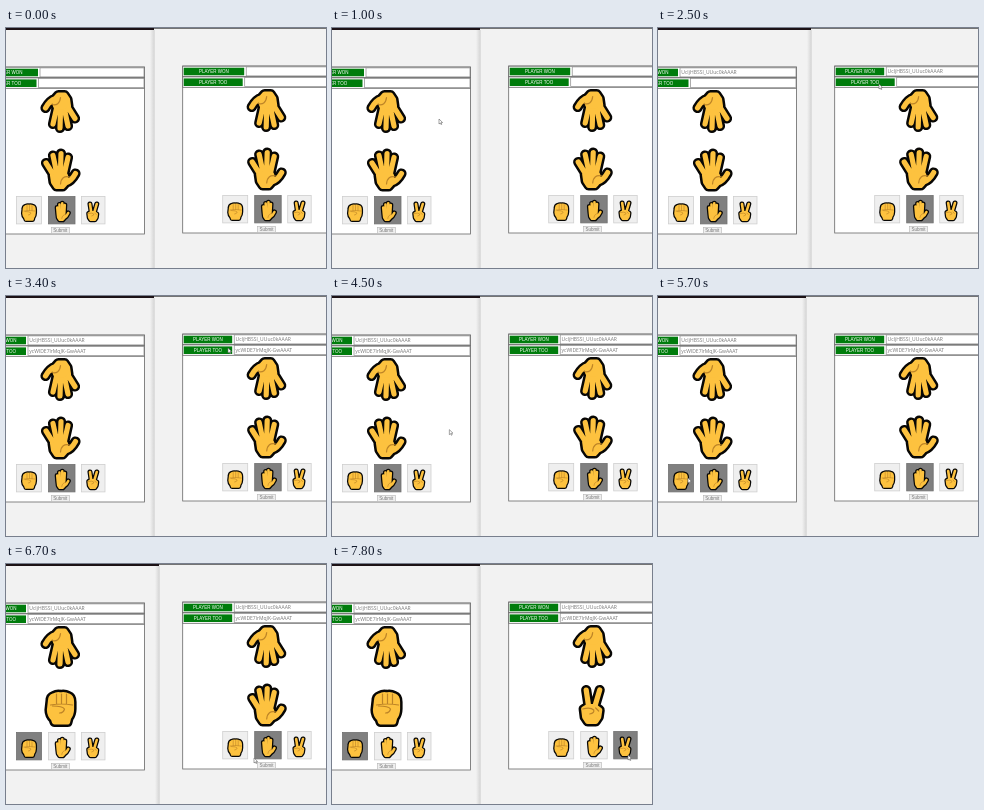
Write an HTML page with a canvas that moves like this. It is 320 px wide and 240 px high and loops after 8 s.

```html
<!DOCTYPE html>
<html lang="en">
<head>
<meta charset="utf-8">
<title>Hand game, two players</title>
<style>
  html, body { margin: 0; width: 100%; height: 100%; overflow: hidden; background: #f2f2f2; }
  canvas { display: block; width: 320px; height: 240px; }
</style>
</head>
<body>
<canvas id="stage"></canvas>
<script>
const LOOP = 8000;
const RIGHT_OFFSET = [206.2, -1];
const canvas = document.getElementById('stage');
const ctx = canvas.getContext('2d');
const ratio = window.devicePixelRatio || 1;
canvas.width = 320 * ratio;
canvas.height = 240 * ratio;

// Each gesture: a thick skeleton plus thin crease lines, centred on 0,0.
const gestures = {
  splayed: {
    body: new Path2D('M-7 5L-14.5-7M-4 2L-7.5-14.5M0 1L0.5-16.5M4 3L7.5-12.5M5 13Q11 11 15 3.5M-8 5L-4 2L3 2L5 6L6 12L2 16.5L-4 16.5L-7 12Z'),
    crease: new Path2D('M9 7Q1 5 0 14')
  },
  raised: {
    body: new Path2D('M-8 4L-9-8M-4 2L-4.5-14M1 2L1-16.5M5 4L6-13M5 13Q10 10 13 3M-8 4L-4 1L3 1L5 6L5 13L2 16.5L-4 16.5L-7 12Z'),
    crease: new Path2D('M8 6Q1 6 0 14')
  },
  fist: {
    body: new Path2D('M-7-10Q-3-12 0-11Q4-12 8-10Q11-9 11-4L11 3Q11 8 8 12L7 16L-6 16L-7 13Q-11 9-11 4L-10-5Q-10-9-7-10Z'),
    crease: new Path2D('M-4-12L-4-2M1-12L1-2M6-12L6-2M-10-1Q1-3 12-1M-8 0Q2 0 4 3Q3 7-1 7')
  },
  peace: {
    body: new Path2D('M-4 2L-6.5-15M2 2L7-15M-9 4L-4 1L3 2L7 5L6 12L3 16.5L-5 16.5L-8 12Z'),
    crease: new Path2D('M-10 4Q-2 2 1 5Q2 8-3 9M3 3L6 6')
  }
};

function drawGesture(name, x, y, scale = 1) {
  const { body, crease } = gestures[name];
  ctx.save();
  ctx.translate(x, y);
  ctx.scale(scale, scale);
  ctx.lineCap = ctx.lineJoin = 'round';
  for (const [color, width] of [['#080705', 10.2], ['#fdc23f', 5.2]]) {
    ctx.strokeStyle = ctx.fillStyle = color;
    ctx.lineWidth = width;
    ctx.stroke(body);
    ctx.fill(body);
  }
  ctx.strokeStyle = '#bd8427';
  ctx.lineWidth = 1.2;
  ctx.stroke(crease);
  ctx.restore();
}

function box(x, y, w, h, fill, border, width = 0.8) {
  ctx.fillStyle = fill;
  ctx.fillRect(x, y, w, h);
  if (!border) return;
  ctx.strokeStyle = border;
  ctx.lineWidth = width;
  ctx.strokeRect(x, y, w, h);
}

function label(text, x, y, font, color, align = 'center') {
  ctx.font = font;
  ctx.fillStyle = color;
  ctx.textAlign = align;
  ctx.textBaseline = 'middle';
  ctx.fillText(text, x, y);
}

function playerRow(y, name, id, emptyEdge) {
  const edge = id ? 20 : emptyEdge;
  box(-29.5, y, 168, 10.4, '#fff', '#666');
  box(-28.5, y + 1.5, edge + 28.5, 7.6, '#007c0c');
  label(name, (edge - 28.5) / 2, y + 5.5, '4.5px "Liberation Sans", Arial, sans-serif', '#fff');
  box(edge + 2, y + 0.7, 136 - edge, 9, '#fff', '#888', 0.7);
  if (id) label(id, edge + 3.3, y + 5.5, '5px "Open Sans", sans-serif', '#777', 'left');
}

function panel(state) {
  box(-29.5, 39, 168, 167, '#fff', '#666');
  playerRow(39.2, 'PLAYER WON', state.ids[0], 32);
  playerRow(49.9, 'PLAYER TOO', state.ids[1], 30.5);
  drawGesture('splayed', 54.5, 83.5, -1);
  drawGesture(state.choice, 54.5, 142);

  const buttons = [['fist', 10.5, 25], ['raised', 42.5, 26.5], ['peace', 75.5, 23.5]];
  for (const [name, x, w] of buttons) {
    const dark = state.dark.includes(name);
    box(x, 168.5, w, 27.4, dark ? '#808080' : '#efefef', dark ? '#707070' : '#cfcfcf');
    drawGesture(name, x + w / 2, 183.5, 0.5);
  }
  box(45.3, 199.4, 18, 6.2, '#efefef', '#b5b5b5', 0.6);
  label('Submit', 54.3, 202.7, '4.5px "Liberation Sans", Arial, sans-serif', '#777');
}

function windowPane(x, w, offset, state) {
  ctx.save();
  ctx.beginPath();
  ctx.rect(x, 0, w, 240);
  ctx.clip();
  box(x, 0, w, 240, '#f2f2f2');
  ctx.translate(...offset);
  panel(state);
  ctx.restore();
}

// Pointer stops: time, x, y.
const pointerStops = [
  [500, 125, 110], [900, 107, 91], [1100, 107, 91], [1600, 8, 45], [1900, 8, 45],
  [2400, 221, 56], [2800, 221, 56], [3100, 222, 52], [3900, 222, 52],
  [4750, 90, 155], [5400, 30, 182], [6400, 30, 182], [6700, 248, 194],
  [7200, 296, 191], [LOOP, 296, 191]
];

function drawPointer(t) {
  const next = pointerStops.findIndex(stop => stop[0] > t);
  if (next < 1) return;
  const [t0, x0, y0] = pointerStops[next - 1];
  const [t1, x1, y1] = pointerStops[next];
  const p = (t - t0) / (t1 - t0);
  const ease = p * p * (3 - 2 * p);
  ctx.save();
  ctx.translate(x0 + (x1 - x0) * ease, y0 + (y1 - y0) * ease);
  ctx.beginPath();
  for (const [x, y] of [[0, 0], [0, 5], [1.2, 4], [2, 5.6], [2.8, 5.2], [2.1, 3.6], [3.6, 3.5]]) ctx.lineTo(x, y);
  ctx.closePath();
  ctx.fillStyle = '#fff';
  ctx.strokeStyle = '#666';
  ctx.lineWidth = 0.6;
  ctx.fill();
  ctx.stroke();
  ctx.restore();
}

function draw(t) {
  const ids = [t >= 1600 && 'UcIjHBSSl_UUuc0kAAAR', t >= 3200 && 'ycWIDE7lrMqJK-GwAAAT'];
  const leftPicked = t >= 5800;
  const rightPicked = t >= 7500;
  const leftDark = leftPicked ? ['fist'] : t >= 5200 ? ['fist', 'raised'] : ['raised'];
  const rightDark = rightPicked ? ['peace'] : t >= 7050 ? ['raised', 'peace'] : ['raised'];
  const leftInFront = (t >= 1600 && t < 3200) || (leftPicked && !rightPicked);
  const edge = leftInFront ? 153 : 148;

  ctx.setTransform(ratio, 0, 0, ratio, 0, 0);
  windowPane(0, edge, [0, 0], { ids, choice: leftPicked ? 'fist' : 'splayed', dark: leftDark });
  windowPane(edge, 320 - edge, RIGHT_OFFSET, { ids, choice: rightPicked ? 'peace' : 'splayed', dark: rightDark });
  box(edge, 0, 320 - edge, 0.9, '#666');
  box(0, 0, edge, 2, '#1c1216');

  const shade = ctx.createLinearGradient(edge - 4, 0, edge + 1, 0);
  shade.addColorStop(0, 'rgba(90,90,90,0)');
  shade.addColorStop(1, 'rgba(90,90,90,.22)');
  box(edge - 4, 2, 4.7, 238, shade);
  drawPointer(t);
}

const start = performance.now();
function tick() {
  draw((performance.now() - start) % LOOP);
  requestAnimationFrame(tick);
}
tick();
</script>
</body>
</html>
```
